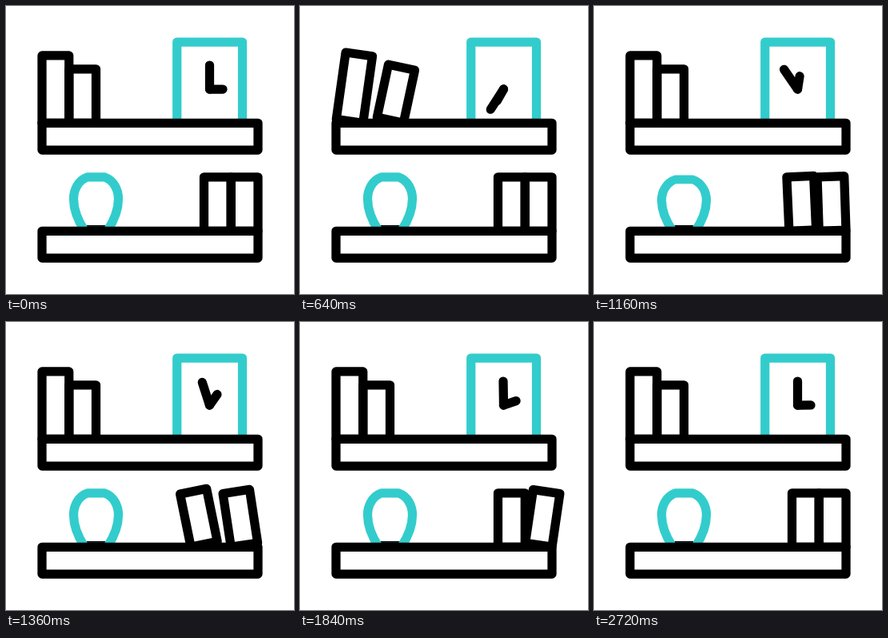
Recreate the animation shown at these times as an HTML page. Size 360x360 px, loop 3000 ms.

```html
<!DOCTYPE html>
<html lang="en">
<head>
<meta charset="utf-8">
<title>Shelves</title>
<style>
  html, body { margin: 0; height: 100%; overflow: hidden; background: #fff; }
  svg { display: block; width: 100vw; height: 100vh; }
  g { fill: none; stroke: #000; stroke-width: 11.25; stroke-linecap: round; stroke-linejoin: round; }
  .teal { stroke: #33cccc; }
</style>
</head>
<body>
<svg viewBox="0 0 360 360">
  <g>
    <path class="teal" d="M213.75 146V45H295.5V146"/>
    <path id="minute" d="M254.5 104V74"/>
    <path id="hour" d="M254.5 104V87.5"/>
    <path d="M98 279.5H127"/>
    <path id="vase" class="teal" d="M102 213.75H123C135 218 140.5 230 140.5 241C140.5 256 134 270 126.5 281.25H98.5C91 270 84.5 256 84.5 241C84.5 230 90 218 102 213.75Z"/>
    <rect id="tall" x="45" y="61.9" width="33.75" height="84.35"/>
    <rect id="short" x="78.75" y="78.75" width="33.75" height="67.5"/>
    <rect id="left" x="247.5" y="213.75" width="33.75" height="67.5"/>
    <rect id="right" x="281.25" y="213.75" width="33.75" height="67.5"/>
    <rect x="45" y="146.25" width="270" height="33.75"/>
    <rect x="45" y="281.25" width="270" height="33.75"/>
  </g>
</svg>
<script>
const LOOP = 3000;
const $ = id => document.getElementById(id);
const place = (id, transform) => $(id).setAttribute('transform', transform);
const clamp = u => Math.min(1, Math.max(0, u));
const smooth = u => u * u * (3 - 2 * u);

// Smooth interpolation through [time, value] keys.
function track(t, ...keys) {
  if (t <= keys[0][0]) return keys[0][1];
  for (let i = 1; i < keys.length; i++) {
    const [t0, a] = keys[i - 1], [t1, b] = keys[i];
    if (t < t1) return a + (b - a) * smooth((t - t0) / (t1 - t0));
  }
  return keys[keys.length - 1][1];
}

// cubic-bezier(1/3, 0, 0, 1), solved by bisection.
function glide(u) {
  u = clamp(u);
  let lo = 0, hi = 1;
  for (let i = 0; i < 24; i++) {
    const s = (lo + hi) / 2;
    if ((1 - s) ** 2 * s + s ** 3 < u) lo = s; else hi = s;
  }
  return smooth(hi);
}

function turnHand(id, angle) {
  place(id, `rotate(${angle} 254.5 104)`);
}

// A book tips over the bottom corner on the side it leans to.
function tip(id, x, base, angle, shift = 0, lift = 0) {
  const pivot = angle > 0 ? x + 33.75 : x;
  place(id, `translate(${shift} ${-lift}) rotate(${angle} ${pivot} ${base})`);
}

function draw(t) {
  turnHand('minute', 360 * glide((t - 100) / 1900));
  turnHand('hour', 90 + 360 * glide((t - 100) / 2665));

  tip('tall', 45, 146.25, track(t, [100, 0], [580, 10], [880, -8.3], [1080, 0]));
  const push = track(t, [100, 0], [600, 1], [860, 0]);
  tip('short', 78.75, 146.25, 13 * push, 18 * push);

  tip('left', 247.5, 281.25,
    track(t, [1060, 0], [1400, -12], [1720, 0]),
    track(t, [1060, 0], [1400, -17], [1600, 0]),
    track(t, [1520, 0], [1600, 4.5], [1720, 0]));
  tip('right', 281.25, 281.25, track(t, [1060, 0], [1400, -9], [1780, 10], [2020, 0]));

  const hop = track(t, [700, 0], [950, 14], [1120, 0]);
  const squash = 1 - track(t, [1100, 0], [1160, 0.045], [1260, 0]);
  place('vase', `translate(0 ${281.25 * (1 - squash) - hop}) scale(1 ${squash})`);
}

function tick() {
  draw(performance.now() % LOOP);
  requestAnimationFrame(tick);
}
tick();
</script>
</body>
</html>
```
